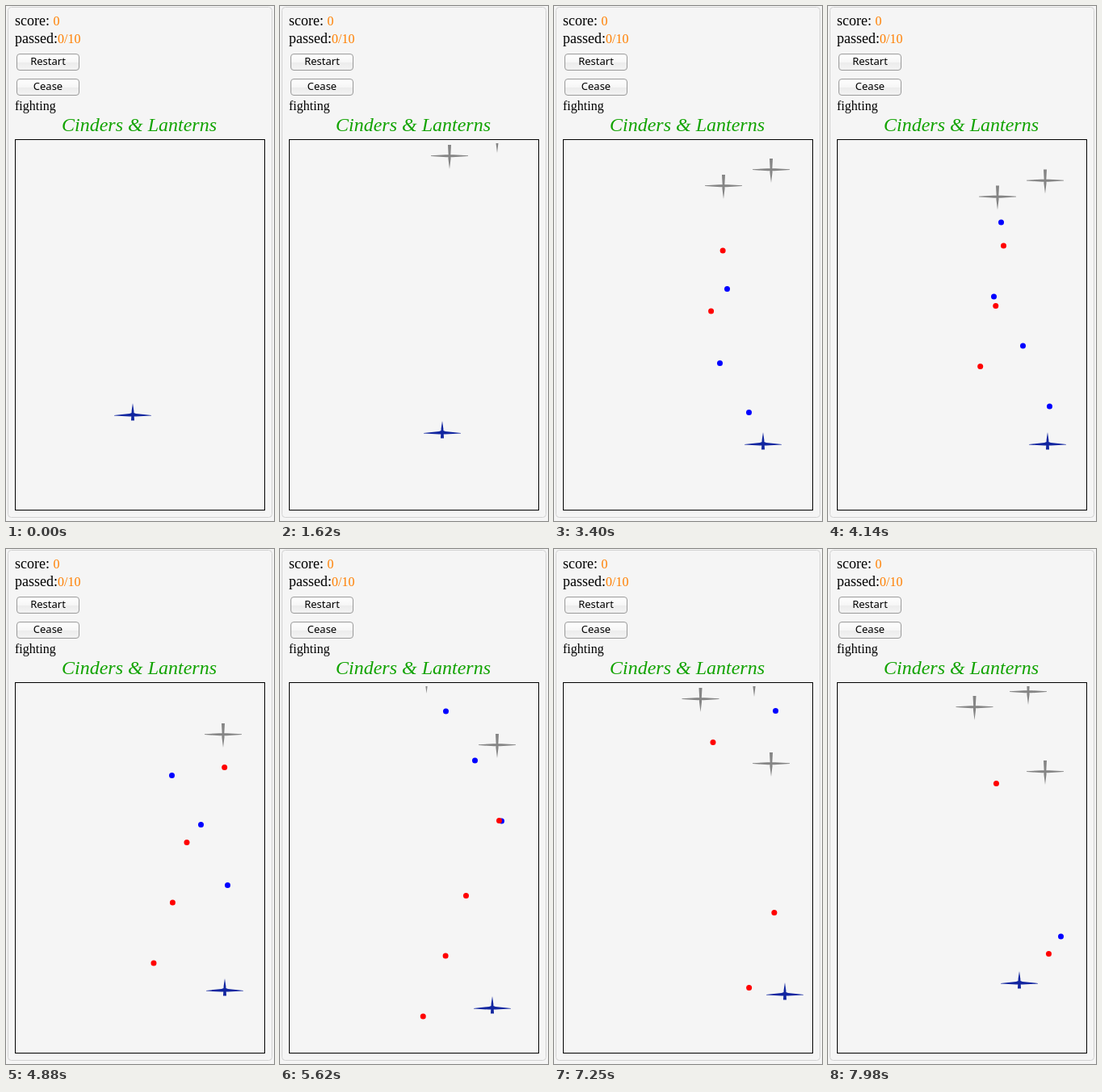
An HTML page for the animation above (8000 ms loop, 332x638 px).

```html
<!DOCTYPE html>
<html lang="en">
<head>
<meta charset="utf-8">
<title>Plane game</title>
<style>
  html, body { margin: 0; width: 100%; height: 100%; overflow: hidden; background: #f5f5f5; }
  svg { display: block; width: 332px; height: 638px; }
  text { font-family: "Liberation Serif", serif; font-size: 16px; }
  .label { font-size: 18px; }
  .count { fill: #ff7f00; }
  .title { font-size: 24px; font-style: italic; fill: #11a300; text-anchor: middle; }
  .button text { font: 13px "Noto Sans", "Open Sans", sans-serif; text-anchor: middle; }
  .button rect { fill: url(#shine); stroke: #9a9a9a; }
  .strut { fill: none; stroke-width: 1; }
  .bar { fill: none; stroke-width: 1.6; }
  .player { fill: #1226a0; stroke: none; }
  .player .strut, .player .bar { stroke: #3045b4; }
  .enemy { fill: #858585; }
  .enemy .strut, .enemy .bar { stroke: #858585; }
</style>
</head>
<body>
<svg viewBox="0 0 332 638">
  <defs>
    <linearGradient id="shine" x2="0" y2="1">
      <stop offset="0" stop-color="#fff"/>
      <stop offset=".5" stop-color="#f6f6f6"/>
      <stop offset=".52" stop-color="#ececec"/>
      <stop offset="1" stop-color="#f3f3f3"/>
    </linearGradient>
    <clipPath id="sky"><rect x="12" y="170" width="309" height="454"/></clipPath>
    <!-- origin: tip of the nose -->
    <g id="fighter">
      <path d="M-23 15L-4 13Q0 11 4 13L23 15V15.6L4 16.6H-4L-23 15.6Z"/>
      <path d="M0 0L1.3 9 2 21.5H-2L-1.3 9Z"/>
      <path class="strut" d="M-4.5 8V30M4.5 8V30"/>
      <path class="bar" d="M-8 30H8"/>
    </g>
    <!-- origin: middle of the tail -->
    <g id="raider">
      <path d="M-23 13.3L-5 12.3H5L23 13.3V13.9L4 15.3H-4L-23 13.9Z"/>
      <path d="M-2 0H2L1.3 13 1.6 17 0 30 -1.6 17 -1.3 13Z"/>
      <path class="strut" d="M-4.5 8V20M4.5 8V20"/>
      <path class="bar" d="M-6.5 .4H6.5"/>
    </g>
  </defs>

  <rect x="2.5" y="1.5" width="327" height="632" rx="4" fill="#f5f5f5" stroke="#d2d2d2"/>
  <text class="label" x="11" y="24">score:</text><text class="count" x="58.5" y="24">0</text>
  <text class="label" x="11" y="46">passed:</text><text class="count" x="64" y="46">0/10</text>
  <g class="button">
    <rect x="13.5" y="59.5" width="77" height="20" rx="3.5"/><text x="52" y="73">Restart</text>
    <rect x="13.5" y="90.5" width="77" height="20" rx="3.5"/><text x="52" y="104">Cease</text>
  </g>
  <text x="11" y="129">fighting</text>
  <text class="title" x="165" y="155">Cinders &amp; Lanterns</text>
  <rect x="11.5" y="165.5" width="309" height="459" fill="none" stroke="#000"/>
  <g id="field" clip-path="url(#sky)"></g>
</svg>
<script>
const LOOP = 8000, STEP = 147.7;
const field = document.getElementById('field');

// [step, game tick]
const clock = [[0, -111], [11, -40], [18, 0], [28, 55], [38, 108], [44, 133], [54, 174]];

// [step, x, nose y]
const flight = [
  [0, 157, 492], [8, 180, 510], [11, 212, 516], [13, 212, 518], [16, 203, 525],
  [18, 203, 525], [21.5, 239, 527], [24, 272, 528], [32, 272, 528], [38, 263, 554],
  [41, 263, 556], [44, 273, 551], [48, 286, 540], [50, 286, 534], [54, 237, 523]
];

function sample(keys, at) {
  let i = 1;
  while (i < keys.length - 1 && keys[i][0] < at) i++;
  const a = keys[i - 1], b = keys[i], p = (at - a[0]) / (b[0] - a[0]);
  return a.slice(1).map((v, n) => v + (b[n + 1] - v) * p);
}

function add(tag, attrs) {
  const node = document.createElementNS('http://www.w3.org/2000/svg', tag);
  for (const key in attrs) node.setAttribute(key, attrs[key]);
  return field.appendChild(node);
}

function place(node, x, y, shown = true) {
  node.setAttribute('transform', `translate(${x} ${y})`);
  node.style.display = shown ? '' : 'none';
}

const enemy = (x, y, tick, until = Infinity) =>
  ({ x, y, tick, vx: 0, vy: .5, from: -Infinity, until,
     node: add('use', { href: '#raider', class: 'enemy' }) });

const bullet = (fill, vy) => (x, y, tick, from, vx = 0, until = Infinity) =>
  ({ x, y, tick, vx, vy, from, until, low: 589, node: add('circle', { r: 3.5, fill }) });

const red = bullet('#f00', 2.5), blue = bullet('#00f', -3);

// Each mover passes through (x, y) at the given tick.
const movers = [
  enemy(210, 195, 0, 60), enemy(269, 175, 0), enemy(181.5, 182, 174), enemy(248, 163, 174)
];
const player = add('use', { href: '#fighter', class: 'player' });
movers.push(
  blue(214.5, 433, 0, -30, 0, 60),
  blue(205.5, 525, 0, -3),
  blue(241.5, 421, 55, 19),
  blue(274.5, 496, 55, 43),
  blue(288.5, 480, 174, 156),
  red(200.5, 309, 0, -41, -.215),
  red(210.5, 234, 0, -5, -.05),
  red(217.5, 297, 55, 33, .245),
  red(271.5, 336.5, 108, 69, .03),
  red(185.5, 188, 133, 126, .56)
);

function draw(now) {
  const step = Math.min(54, Math.floor(now % LOOP / STEP));
  const [tick] = sample(clock, step);
  for (const m of movers) {
    const dt = tick - m.tick, y = m.y + m.vy * dt;
    place(m.node, m.x + m.vx * dt, Math.round(y * 2) / 2,
      tick >= m.from && tick < m.until && !(y > m.low));
  }
  place(player, ...sample(flight, step).map(Math.round));
}

const start = performance.now();
function tickFrame() {
  draw(performance.now() - start);
  requestAnimationFrame(tickFrame);
}
tickFrame();
</script>
</body>
</html>
```
